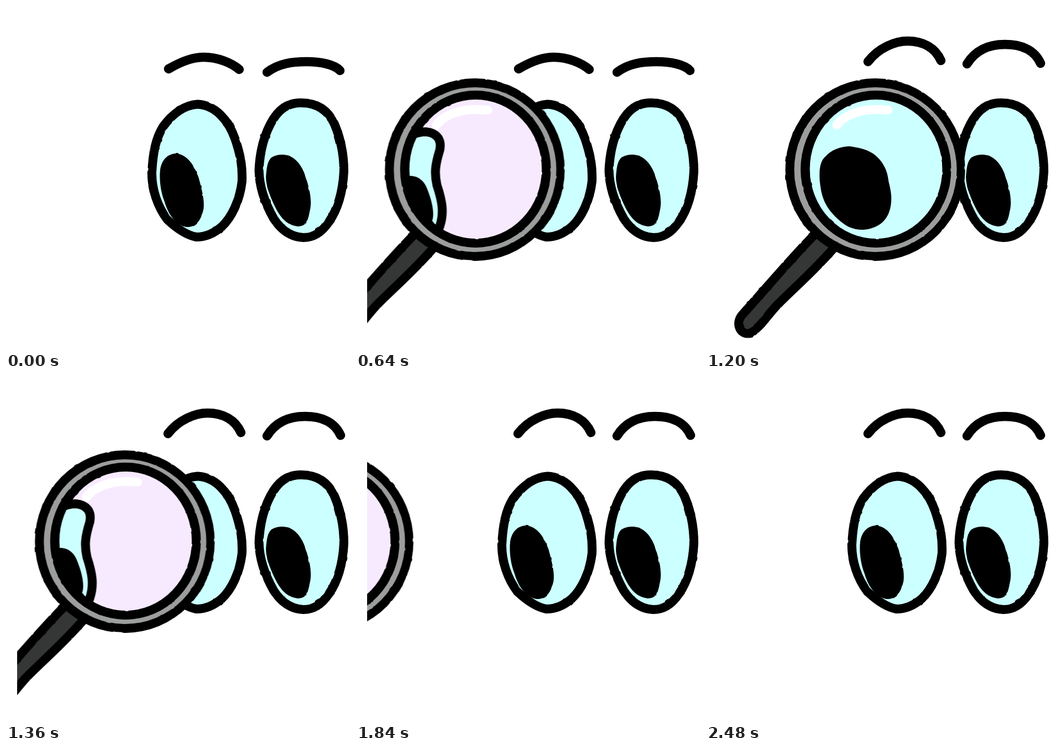
Write an HTML page without scripts that moves like this. It is 618x618 px and loops after 2560 ms.

```html
<!DOCTYPE html>
<html lang="en">
<head>
<meta charset="utf-8">
<title>Eyes and magnifying glass</title>
<style>
  html, body { margin: 0; width: 100%; height: 100%; overflow: hidden; background: #fff; }
  svg { display: block; width: 618px; height: 618px; }

  .line { fill: none; stroke: #000; stroke-width: 16; stroke-linecap: round; stroke-linejoin: round; }
  .eye { fill: #cff; }
  .handle { fill: #343735; }
  .shine { stroke: #fff; }

  /* Small negative delay keeps step changes clear of frame boundaries. */
  .glass, .view, .brow { animation: 2560ms -5ms infinite step-end; }
  .glass { animation-name: slide; animation-timing-function: steps(10); }
  .part { animation-name: part; }
  .most { animation-name: most; }
  .full { animation-name: full; }
  .brow { animation-duration: 320ms; stroke-width: 16.500px; }
  .low { animation-name: low; }
  .mid { animation-name: mid; }
  .high { animation-name: high; }

  @keyframes slide {
    0%, 78.125%, 100% { transform: translateX(-453px); }
    31.25%, 46.875% { transform: translateX(0); }
  }
  @keyframes part {
    0%, 28.125%, 56.25%, 100% { opacity: 0; }
    25%, 53.125% { opacity: 1; }
  }
  @keyframes most {
    0%, 31.25%, 53.125%, 100% { opacity: 0; }
    28.125%, 50% { opacity: 1; }
  }
  @keyframes full {
    0%, 50%, 100% { opacity: 0; }
    31.25% { opacity: 1; }
  }
  @keyframes low { 0% { opacity: 1; } 25%, 100% { opacity: 0; } }
  @keyframes mid { 0%, 50%, 100% { opacity: 0; } 25%, 75% { opacity: 1; } }
  @keyframes high { 0%, 75%, 100% { opacity: 0; } 50% { opacity: 1; } }
</style>
</head>
<body>
<svg viewBox="0 0 618 618">
  <defs>
    <clipPath id="page"><path d="M20 0H618V618H20Z"/></clipPath>
    <clipPath id="lens"><ellipse cx="305" cy="293" rx="122" ry="128"/></clipPath>
    <filter id="wobble" filterUnits="userSpaceOnUse" x="0" y="0" width="618" height="618" color-interpolation-filters="sRGB">
      <feTurbulence type="fractalNoise" baseFrequency=".06" seed="4"/>
      <feDisplacementMap in="SourceGraphic" scale="2.500" xChannelSelector="R" yChannelSelector="G"/>
    </filter>
    <path id="bigPupil" d="M258 252C275 255 285 256 300 265C318 278 326 295 328 315C333 335 334 345 332 358C328 385 310 400 282 402C262 402 250 395 236 382C215 362 208 345 205 320C203 300 203 280 215 270C226 258 240 253 258 252Z"/>
  </defs>

  <g class="line">
    <path class="brow low" d="M292 113C320 97 338 92 356 92C380 92 405 102 419 114M469 119C490 103 515 100 540 100C565 100 590 105 600 116"/>
    <path class="brow mid" d="M291 100C310 75 340 63 362 63C390 63 412 75 422 98M469 104C485 78 510 69 537 69C565 69 590 78 601 103"/>
    <path class="brow high" d="M291 88C305 52 335 30 362 30C392 30 414 50 423 84M469 90C483 54 510 38 537 38C565 38 590 54 601 90"/>
  </g>

  <g filter="url(#wobble)">
    <path class="line eye" d="M344 176.500C376 178 400 205 412 240C422 270 425 290 424 315C420 350 405 380 388 396C370 412 355 415 342 415C325 412 305 398 290 384C272 360 262 330 262 300C264 265 268 240 282 217C300 192 322 178 344 176.500Z"/>
    <path class="line eye" d="M530 174C558 174 578 186 590 212C602 240 607 270 607 297C605 335 596 365 580 388C566 408 552 416 534 416C512 415 494 402 481 382C464 352 455 325 454.500 295C456 260 463 235 475 212C489 185 506 174 530 174Z"/>
    <path d="M305 265C322 266 336 280 346 308C352 330 357 350 355 364C351 384 342 398 324 397C306 394 292 376 285 352C278 335 275 312 277 294C280 276 290 266 305 265Z"/>
    <path d="M498 267C516 268 530 282 538 306C546 330 549 348 547 362C543 382 542 396 524 396C506 394 494 382 484 362C474 342 467 322 467 308C468 290 470 278 477 272C484 268 490 267 498 267Z"/>
  </g>

  <g clip-path="url(#page)">
    <g class="glass">
      <g filter="url(#wobble)">
        <path class="line handle" d="M198 408C160 445 110 505 64 556C52 572 62 592 80 588C100 575 110 555 130 535C160 505 200 470 232 432"/>
        <ellipse cx="304" cy="294" rx="161.500" ry="164"/>
        <ellipse cx="304.500" cy="294" rx="146" ry="148" fill="#9c9e9d"/>
        <ellipse cx="305" cy="293.500" rx="135" ry="140"/>
        <ellipse cx="305.500" cy="293" rx="119.500" ry="125.500" fill="#f7eaff"/>
      </g>
      <g clip-path="url(#lens)">
        <g class="view part">
          <path class="line eye" d="M165 250C185 232 200 226 216 226C236 228 245 240 241 259C233 285 231 300 236 322C246 352 249 372 241 396L225 430H165Z"/>
          <path d="M165 310C196 298 212 310 219 330C229 355 233 380 225 390L200 410H165Z"/>
        </g>
        <g class="view most">
          <path class="line eye" d="M165 190C200 170 260 160 296 180C326 198 338 230 331 265C327 300 331 320 339 350C345 380 332 405 305 435H165Z"/>
          <use href="#bigPupil" x="-48"/>
        </g>
        <g class="view full">
          <ellipse class="eye" cx="305.500" cy="293" rx="119.500" ry="125.500"/>
          <use href="#bigPupil"/>
        </g>
      </g>
      <path class="line shine" d="M235 214C252 192 285 183 327 187"/>
      <g class="line" filter="url(#wobble)">
        <ellipse cx="305.500" cy="293" rx="127" ry="133"/>
      </g>
    </g>
  </g>
</svg>
</body>
</html>
```
